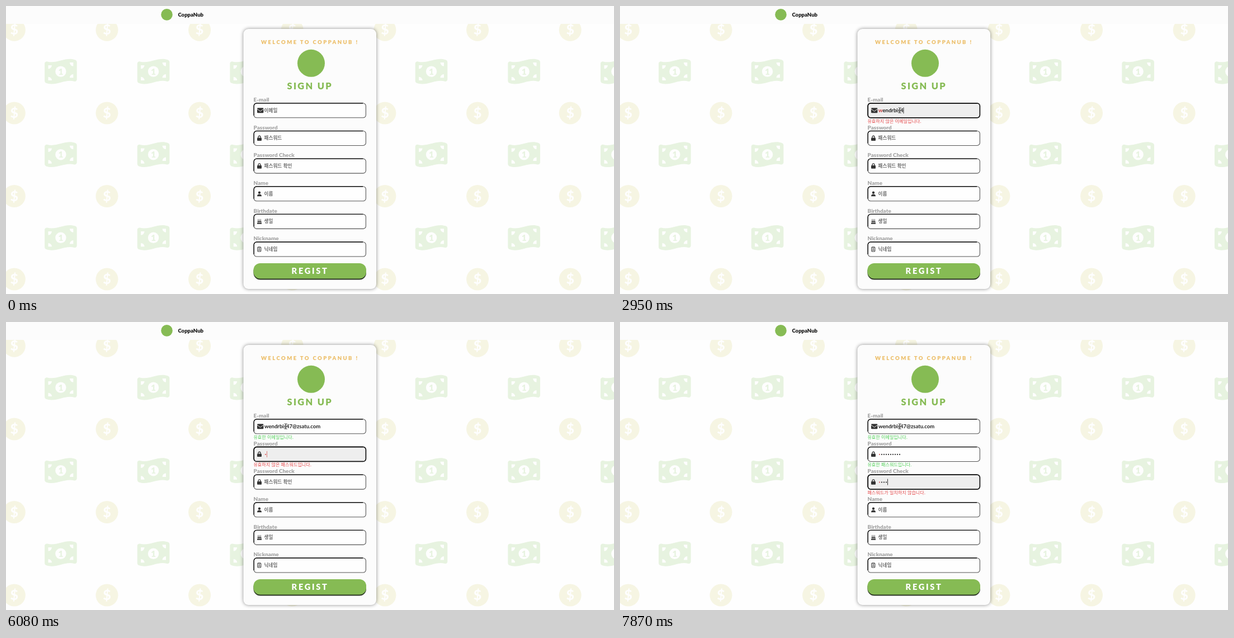
Animation, 1087 px wide and 515 px high, one loop 8000 ms. Source, as an HTML page:

```html
<!DOCTYPE html>
<html lang="ko">
<head>
<meta charset="utf-8">
<title>Sign up</title>
<style>
  html, body { margin: 0; width: 100%; height: 100%; overflow: hidden; background: #fefefe; }
  svg { display: block; width: 100%; height: 100%; }
  text { font-family: Lato, "Noto Sans CJK KR", "Noto Sans CJK", sans-serif; white-space: pre; }
  .ko { font-family: "Noto Sans CJK KR", "Noto Sans CJK", sans-serif; }
  .label { font-size: 9.9px; font-weight: 900; fill: #a5a5a5; }
  .hint { font-size: 8.6px; font-weight: 700; fill: #6e6e6e; }
  .note { font-size: 8.1px; }
  .value { font-size: 9.5px; font-weight: 700; fill: #222; }
  .card { filter: drop-shadow(0 0 3px rgba(0, 0, 0, .45)); }
</style>
</head>
<body>
<svg id="stage" viewBox="0 0 1087 515"></svg>
<script>
const stage = document.getElementById('stage');
const LOOP = 8000, ROW = 49.65, LEFT = 462;
const GREEN = '#86bb54', RED = '#e5484a', OK = '#4fcf56';
const EMAIL = 'wendrbis47@zsatu.com';

// Moments at which each character appears
const emailKeys = [1220, 1700, 1830, 1970, 2160, 2360, 2490, 2620, 2950, 3080,
  3280, 3550, 3680, 3810, 4270, 4340, 4800, 4930, 5130, 5200];
const passKeys = [6080, 6270, 6370, 6470, 6600, 6670, 6740, 6800, 6900, 7000];
const checkKeys = [7460, 7730, 7800, 7870];

const fields = [
  ['E-mail', '이메일'], ['Password', '패스워드'], ['Password Check', '패스워드 확인'],
  ['Name', '이름'], ['Birthdate', '생일'], ['Nickname', '닉네임']
];

const lock = `<rect y="-1" width="8" height="5.6" rx="1"/>
  <path d="M2-.6V-2.2a2 2 0 0 1 4 0V-.6" fill="none" stroke="#333" stroke-width="1.3"/>`;
const icons = [
  `<rect y="-4.5" width="11.4" height="9" rx="1.4"/>
   <path d="M0-2.6L5.7 1.5L11.4-2.6" fill="none" stroke="#fff" stroke-width=".9"/>`,
  lock, lock,
  `<circle cx="4" cy="-2.1" r="2.2"/><path d="M0 4.4a4 3.7 0 0 1 8 0z"/>`,
  `<path d="M0 2h8v2.4H0zM.4 1.2V0q0-1 1-1h5.2q1 0 1 1v1.2q-.9.6-1.8 0-.9-.6-1.8 0-.9.6-1.8 0-.9-.6-1.8 0z"/>
   <path d="M1.7-1.5v-2M4-1.5v-2M6.3-1.5v-2M1.7-4v-.6M4-4v-.6M6.3-4v-.6" stroke="#333" stroke-width=".9"/>`,
  `<rect x=".9" y="-3.9" width="5.8" height="7.8" rx="1" fill="none" stroke="#333" stroke-width="1.1"/>
   <circle cx="3.8" cy="-.8" r="1.05"/><path d="M2.1 2.2a1.7 1.6 0 0 1 3.4 0z"/>
   <path d="M2.9-2.7h1.8" stroke="#333" stroke-width=".6"/>`
];

const bill = `<g id="bill">
  <path fill="#e7f3e0" transform="scale(.1) translate(-288 -256)" d="M0 112V422c0 18 10 35 27 41c87 33 174 11 261-11
    c80-20 160-41 239-19c23 6 49-10 49-33V90c0-18-10-35-27-41C462 16 375 38 288 60C208 81 128 101 49 79C26 73 0 89 0 112z"/>
  <path fill="#fefefe" transform="scale(.1) translate(-288 -256)" d="M64 352a64 64 0 0 1 64 64H64zM128 144a64 64 0 0 1-64 64V144z
    M512 304v64H448a64 64 0 0 1 64-64zM448 96h64v64a64 64 0 0 1-64-64z"/>
  <circle r="9.7" fill="#fefefe"/>
  <text y="5.6" text-anchor="middle" font-size="15.5" font-weight="900" fill="#e7f3e0">1</text></g>`;
const coin = `<g id="coin"><circle r="20" fill="#f6f5e3"/>
  <text y="8.6" text-anchor="middle" font-size="25" font-weight="800" fill="#fefefe">$</text></g>`;

function pattern() {
  let out = '';
  for (let c = 0; c < 7; c++) for (let r = 0; r < 4; r++) {
    const x = 14.8 + c * 165.65, y = 42.8 + r * 148.6;
    out += `<use href="#coin" x="${x}" y="${y}"/>`;
    if (r < 3) out += `<use href="#bill" x="${x + 83.1}" y="${y + 74.3}"/>`;
  }
  return out;
}

function field([label, hint], i) {
  const y = 173.8 + i * ROW, mid = y + 13;
  return `<text class="label" x="442.6" y="${y - 2.8}">${label}</text>
    <rect id="box${i}" x="443.2" y="${y}" width="200.2" height="26" rx="5"/>
    <path d="M443.2 ${y + 22}v-17a5 5 0 0 1 5-5h190" fill="none" stroke="#111" stroke-width="1.4"/>
    <g transform="translate(449 ${mid})" fill="#333">${icons[i]}</g>
    <text id="hint${i}" class="ko hint" x="461.6" y="${mid + 2.9}">${hint}</text>
    <g id="dots${i}"></g>
    <text id="note${i}" class="ko note" x="442.4" y="${y + 35}"></text>`;
}

stage.innerHTML = `<defs>${bill}${coin}</defs>
  <rect width="1087" height="515" fill="#fefefe"/>${pattern()}
  <rect width="1087" height="32" fill="#fcfcfc"/>
  <circle cx="287.5" cy="15.4" r="10.3" fill="${GREEN}"/>
  <text x="307.5" y="19" font-size="9.5" font-weight="900" fill="#151515">CoppaNub</text>
  <rect class="card" x="424.5" y="41" width="237.5" height="465" rx="9" fill="#fcfcfc"/>
  <text x="456" y="68" font-size="9.5" font-weight="900" letter-spacing="2.4" fill="#ecbd66">WELCOME TO COPPANUB !</text>
  <circle cx="545.5" cy="102.3" r="24.5" fill="${GREEN}"/>
  <text x="502.6" y="149.4" font-size="16.4" font-weight="900" letter-spacing="2.3" fill="${GREEN}">SIGN UP</text>
  ${fields.map(field).join('')}
  <text id="email" class="value" x="${LEFT}" y="189.8"><tspan id="first"></tspan><tspan id="rest"></tspan></text>
  <rect x="442.5" y="462" width="201.5" height="27.4" rx="12" fill="#2b3524"/>
  <rect x="442.5" y="460" width="201.5" height="27.4" rx="12" fill="${GREEN}"/>
  <text x="510.6" y="479" font-size="14.6" font-weight="900" letter-spacing="2.7" fill="#fff">REGIST</text>
  <rect id="caret" width=".9" height="11"/>
  <g id="arrow"><path d="M0 0V11.5L2.7 9L4.5 13L6.3 12.2L4.6 8.3H8.2z" fill="#111" stroke="#fff" stroke-width=".8"/></g>
  <g id="beam" fill="none"><path id="beamEdge" stroke="#fff" stroke-width="2.2" d="M497.8 182h1.6q.9 0 .9.9v7.4q0 .9-.9.9h-1.6M502.8 182h-1.6q-.9 0-.9.9v7.4q0 .9.9.9h1.6"/>
    <path stroke="#333" stroke-width="1" d="M497.8 182h1.6q.9 0 .9.9v7.4q0 .9-.9.9h-1.6M502.8 182h-1.6q-.9 0-.9.9v7.4q0 .9.9.9h1.6"/></g>`;

const el = id => document.getElementById(id);
const show = (id, on) => el(id).setAttribute('display', on ? 'inline' : 'none');
const set = (id, attrs) => { for (const k in attrs) el(id).setAttribute(k, attrs[k]); };
const typed = (keys, t) => keys.filter(k => k <= t).length;

function note(i, text, good) {
  el('note' + i).textContent = text;
  set('note' + i, { fill: good ? OK : RED });
}

function dots(i, n) {
  const y = 187.2 + i * ROW;
  let out = '';
  for (let k = 0; k < n; k++)
    out += `<circle cx="${464 + k * 4}" cy="${y}" r="1.1" fill="${k ? '#222' : '#d9585a'}"/>`;
  el('dots' + i).innerHTML = out;
}

function pointer(t) {
  const done = t >= 690;
  show('beam', done);
  show('arrow', t >= 130 && !done);
  const k = Math.floor((t - 130) / 70) / 8, p = 1 - (1 - k) ** 2;
  set('arrow', { transform: `translate(${987 - 487 * p} ${486 - 299 * p})` });
}

function draw(t) {
  const n = [typed(emailKeys, t), typed(passKeys, t), typed(checkKeys, t)];
  const focus = t < 890 ? -1 : t < 5530 ? 0 : t < 7200 ? 1 : 2;

  fields.forEach((_, i) => {
    const on = i === focus;
    set('box' + i, {
      fill: on ? (t < 950 ? '#f5f5f5' : '#eeeeee') : '#fefefe',
      stroke: on ? '#111' : '#555', 'stroke-width': on ? 1.7 : 1.1
    });
    show('hint' + i, !n[i]);
  });

  el('first').textContent = EMAIL.slice(0, Math.min(n[0], 1));
  el('rest').textContent = EMAIL.slice(1, Math.max(n[0], 1));
  set('first', { fill: focus === 0 ? '#c8403f' : '#222' });
  dots(1, n[1]);
  dots(2, n[2]);

  const mailOk = n[0] >= 18, passOk = n[1] >= 10;
  note(0, n[0] ? (mailOk ? '유효한 이메일입니다.' : '유효하지 않은 이메일입니다.') : '', mailOk);
  note(1, n[1] ? (passOk ? '유효한 패스워드입니다.' : '유효하지 않은 패스워드입니다.') : '', passOk);
  note(2, n[2] ? '패스워드가 일치하지 않습니다.' : '', false);

  show('caret', focus >= 0);
  if (focus >= 0) {
    const w = focus ? n[focus] * 4 : n[0] ? el('email').getComputedTextLength() : 0;
    set('caret', { x: LEFT + w + .1, y: 181.3 + focus * ROW, fill: n[focus] === 1 ? '#dc6a68' : '#222' });
  }
  pointer(t);
}

const start = performance.now();
function tick() {
  draw((performance.now() - start) % LOOP);
  requestAnimationFrame(tick);
}
tick();
</script>
</body>
</html>
```
